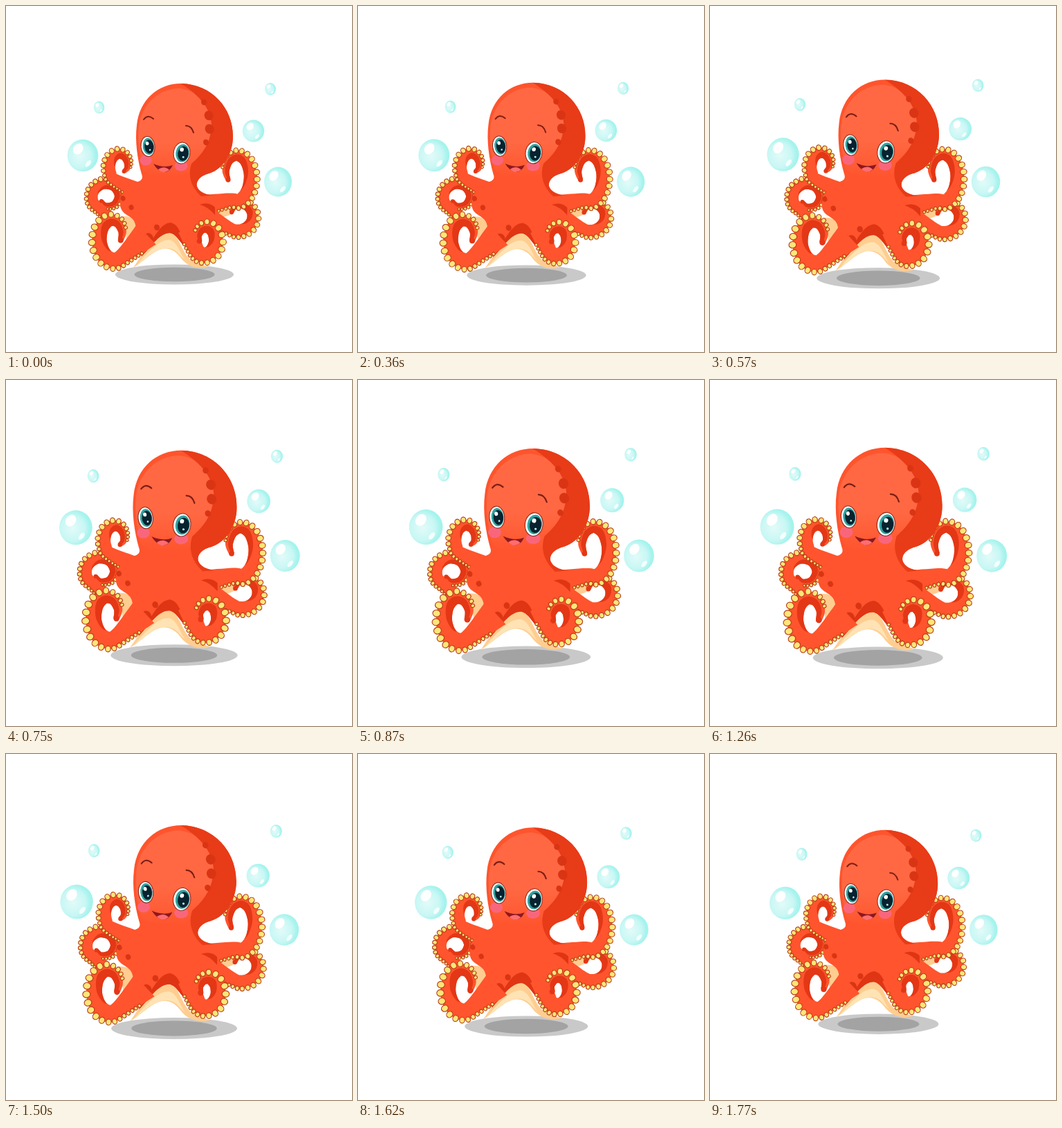
Recreate the animation shown at these times as an HTML page. Size 500 by 500 pixels, loop 1.8 s.

```html
<!DOCTYPE html>
<html lang="en">
<head>
<meta charset="utf-8">
<title>Octopus</title>
<style>
html, body { margin: 0; width: 100%; height: 100%; overflow: hidden; background: #fff; }
svg { display: block; width: 100vw; height: 100vh; }
</style>
</head>
<body>
<svg viewBox="0 0 500 500">
  <defs>
    <path id="bodyShape" d="M196 243C190 222 186 195 189 172C193 135 220 112 253 112C298 113 328 148 328 188C328 215 312 238 290 243C278 247 273 256 277 263C281 270 290 273 302 274L302 302C286 312 278 318 274 335L262 350C252 345 248 330 237 328C222 328 212 345 196 362L180 345C190 335 190 315 183 308C175 300 165 300 165 285C165 268 178 257 190 254C197 252 198 248 196 243Z"/>
    <clipPath id="bodyClip"><use href="#bodyShape"/></clipPath>
    <radialGradient id="glass" cx=".4" cy=".52" r=".62">
      <stop offset="0" stop-color="#e2fbf9"/>
      <stop offset=".6" stop-color="#c8f7f4"/>
      <stop offset=".85" stop-color="#a5f3ed"/>
    </radialGradient>
    <linearGradient id="brow" x2="0" y2="1">
      <stop offset=".6" stop-color="#ff6842"/>
      <stop offset="1" stop-color="#ff542d"/>
    </linearGradient>
  </defs>
  <g id="scene">
    <g id="bubbles"></g>
    <ellipse cx="243.5" cy="388" rx="85.5" ry="14.5" fill="#c9c9c9"/>
    <ellipse cx="243.5" cy="388" rx="58" ry="10.3" fill="#a3a3a3"/>

    <!-- pale undersides -->
    <g fill="#ffcd90">
      <path d="M166 304C186 302 192 314 190 332C188 346 180 352 171 355C177 338 174 320 162 310Z"/>
      <path d="M292 283Q322 281 338 287Q328 306 304 306Z"/>
      <path d="M270 318L284 320C276 332 277 344 285 354L268 350Z"/>
      <path d="M194 363C212 345 222 327 237 327C250 330 252 352 266 366L292 377C275 381 262 375 254 366C246 354 236 349 226 351C212 354 202 367 184 378Z"/>
    </g>
    <path d="M198 364C212 350 222 338 236 338C247 340 250 354 258 366C248 358 246 349 230 350C214 352 204 364 190 374Z" fill="#ffe3b4"/>

    <g id="backArms"></g>
    <use href="#bodyShape" fill="#ff542d"/>
    <g clip-path="url(#bodyClip)">
      <path d="M192 175C196 139 224 118 252 119C282 124 302 148 298 184C296 214 280 232 262 244C240 254 206 250 198 236C193 214 190 194 192 175Z" fill="url(#brow)"/>
      <path d="M246 108C280 128 296 148 297 172C296 198 284 214 268 228C262 246 268 262 282 275L340 270V108Z" fill="#e83b18"/>
      <path d="M196 362C214 336 222 314 238 313C250 316 254 330 258 352L236 340Z" fill="#df3514"/>
      <path d="M280 287Q294 282 303 292L302 302Q292 290 280 287Z" fill="#df3514"/>
    </g>
    <g id="spots" fill="#d93515"></g>
    <g id="frontArms"></g>

    <!-- face -->
    <g fill="#f9667c">
      <ellipse cx="202" cy="223" rx="8.5" ry="7.5"/>
      <ellipse cx="253" cy="231" rx="9.5" ry="7.5"/>
    </g>
    <g id="eyes"></g>
    <g fill="none" stroke="#7b1d16" stroke-width="2" stroke-linecap="round">
      <path d="M199 164Q205 156 213 163"/>
      <path d="M260 173Q268 173 271 183"/>
    </g>
    <path d="M213 228Q228 235 241 230Q236 241 227 240Q219 238 213 228Z" fill="#8c1820"/>
    <path d="M220 236Q229 230 236 237Q231 241 226 240Q222 239 220 236Z" fill="#ff6d70"/>
  </g>
</svg>
<script>
const NS = "http://www.w3.org/2000/svg";
const $ = id => document.getElementById(id);
const mix = (a, b, t) => a + (b - a) * t;

function add(parent, tag, attrs) {
  const el = document.createElementNS(NS, tag);
  for (const k in attrs) el.setAttribute(k, attrs[k]);
  parent.appendChild(el);
  return el;
}

function oval(parent, cx, cy, rx, ry, turn = 0, attrs = {}) {
  return add(parent, "ellipse", { cx, cy, rx, ry, transform: `rotate(${turn} ${cx} ${cy})`, ...attrs });
}

// Catmull-Rom point, u from 0 to 1
function spline(pts, u) {
  const last = pts.length - 1;
  const i = Math.min(last - 1, Math.floor(u * last));
  const t = u * last - i;
  const a = pts[Math.max(0, i - 1)], b = pts[i], c = pts[i + 1], d = pts[Math.min(last, i + 2)];
  return b.map((v, k) => v + 0.5 * t * (c[k] - a[k] +
    t * (2 * a[k] - 5 * v + 4 * c[k] - d[k] + t * (3 * (v - c[k]) + d[k] - a[k]))));
}

// A root [x, y, half width] followed by a spiral that tightens towards the tip
function curl(root, hub, radii, [from, to], width) {
  const pts = [root], steps = 8;
  for (let i = 0; i <= steps; i++) {
    const u = i / steps, a = mix(from, to, u) * Math.PI / 180;
    const f = 1 - 0.55 * u ** 3;
    pts.push([hub[0] + radii[0] * f * Math.cos(a), hub[1] + radii[1] * f * Math.sin(a),
      width * mix(1, 0.33, u * u)]);
  }
  const side = Math.sign(to - from);
  // k = 1 is the outer edge, -1 the inner edge
  return (u, k) => {
    const [x, y, w] = spline(pts, u);
    const p = spline(pts, Math.max(0, u - 0.005)), q = spline(pts, Math.min(1, u + 0.005));
    const a = Math.atan2(q[1] - p[1], q[0] - p[0]);
    return [x + Math.sin(a) * side * w * k, y - Math.cos(a) * side * w * k, a * 180 / Math.PI, w];
  };
}

function ribbon(parent, at, from, outer, fill) {
  const edge = [], inner = [], steps = 70;
  for (let i = 0; i <= steps; i++) {
    const u = mix(from, 1, i / steps);
    const k = from ? mix(-1, outer, Math.min(1, i / 30)) : outer;
    edge.push(at(u, k).slice(0, 2).map(v => v.toFixed(1)));
    inner.unshift(at(u, -1).slice(0, 2).map(v => v.toFixed(1)));
  }
  add(parent, "path", { d: "M" + edge.concat(inner).map(p => p.join(" ")).join("L") + "Z", fill });
}

// Suckers sit side by side on the outer edge, small at both ends
function suckers(parent, at, size) {
  const g = add(parent, "g", { fill: "#ffe677", stroke: "#b8401a", "stroke-width": 1.1 });
  let last = null;
  for (let u = 0.06; u < 0.88; u += 0.003) {
    const [x, y, turn] = at(u, 0.98);
    const r = size * (0.45 + 0.55 * Math.sin(Math.PI * (u - 0.06) / 0.82));
    if (last && Math.hypot(x - last.x, y - last.y) < (r + last.r) * 1.08) continue;
    oval(g, x, y, r, r * 0.88, turn + 90);
    last = { x, y, r };
  }
}

function arm(parent, root, hub, radii, sweep, width) {
  const at = curl(root, hub, radii, sweep, width);
  ribbon(parent, at, 0, 1, "#ff542d");
  const [x, y, , w] = at(1, 0);
  oval(parent, x, y, w, w, 0, { fill: "#e33716" });
  ribbon(parent, at, 0.3, 0.25, "#e33716");
  suckers(parent, at, width * 0.43);
}

function bubble(x, y, rx, ry) {
  const part = (dx, dy, w, h, turn, fill) =>
    oval($("bubbles"), x + dx * rx, y + dy * ry, w * rx, h * ry, turn, { fill });
  part(0, 0, 1, 1, 0, "url(#glass)");
  part(-0.3, -0.4, 0.3, 0.36, 35, "#fff");
  part(0.35, 0.5, 0.13, 0.24, 40, "#f4fffe");
}

function eye(x, y, rx, ry, turn) {
  const g = add($("eyes"), "g", { transform: `translate(${x} ${y}) rotate(${turn})` });
  oval(g, 0, 0, rx, ry, 0, { fill: "#fff", stroke: "#8d2419", "stroke-width": 1 });
  oval(g, rx * 0.08, 0, rx * 0.82, ry * 0.84, 0, { fill: "#2fa3a0" });
  oval(g, rx * 0.18, 0.5, rx * 0.66, ry * 0.68, 0, { fill: "#08222f" });
  oval(g, -rx * 0.05, -ry * 0.32, rx * 0.24, ry * 0.19, 0, { fill: "#fff" });
  oval(g, rx * 0.25, ry * 0.36, rx * 0.13, ry * 0.09, 0, { fill: "#b8f0ed" });
}

// A row of spots that swells in the middle
function spots(x0, y0, x1, y1, count, size, bend) {
  for (let i = 0; i < count; i++) {
    const t = i / (count - 1), bulge = Math.sin(Math.PI * t);
    const r = size * (1 + 0.7 * bulge);
    oval($("spots"), mix(x0, x1, t) + bend * bulge, mix(y0, y1, t), r, r * 1.1, -20);
  }
}

bubble(111, 216, 22.3, 23.3);
bubble(393, 254, 20, 21.5);
bubble(357.5, 180.5, 15.7, 16);
bubble(382, 120, 8, 9);
bubble(134.5, 146.5, 7.8, 9);

const back = $("backArms"), front = $("frontArms");
arm(back, [150, 308, 9], [145, 276], [21, 20], [110, 500], 8.5);
arm(back, [200, 272, 14], [165, 233], [16, 21], [120, 400], 9);
arm(back, [285, 302, 16], [335, 303], [23, 22], [130, -150], 9.5);
arm(back, [285, 288, 15], [331, 247], [23, 36], [110, -195], 10.5);
arm(front, [203, 330, 20], [156, 336], [22, 32], [50, 370], 12);
arm(front, [262, 322, 14], [287, 338], [17, 22], [130, -190], 11.5);

spots(286, 139, 289, 197, 4, 4, 7);
spots(218, 320, 194, 351, 3, 4, 0);
spots(181, 291, 169, 278, 2, 3.5, 0);

eye(205, 203, 10, 14.5, -6);
eye(254, 212.500, 11.800, 15.500, 8);

const LOOP = 1800, REST = 240, STEP = 30, PEAK = 1100, CX = 251, CY = 254;

function draw(ms) {
  const t = Math.floor((ms % LOOP) / STEP) * STEP;
  const swell = t < REST ? 0 : 0.054 * (1 + Math.cos(2 * Math.PI * (t - PEAK) / LOOP));
  $("scene").setAttribute("transform",
    `translate(${CX} ${CY}) scale(${1 + swell}) translate(${-CX} ${-CY})`);
}

let start;
function tick(now) {
  if (start === undefined) start = now;
  draw(now - start);
  requestAnimationFrame(tick);
}
draw(0);
requestAnimationFrame(tick);
</script>
</body>
</html>
```
